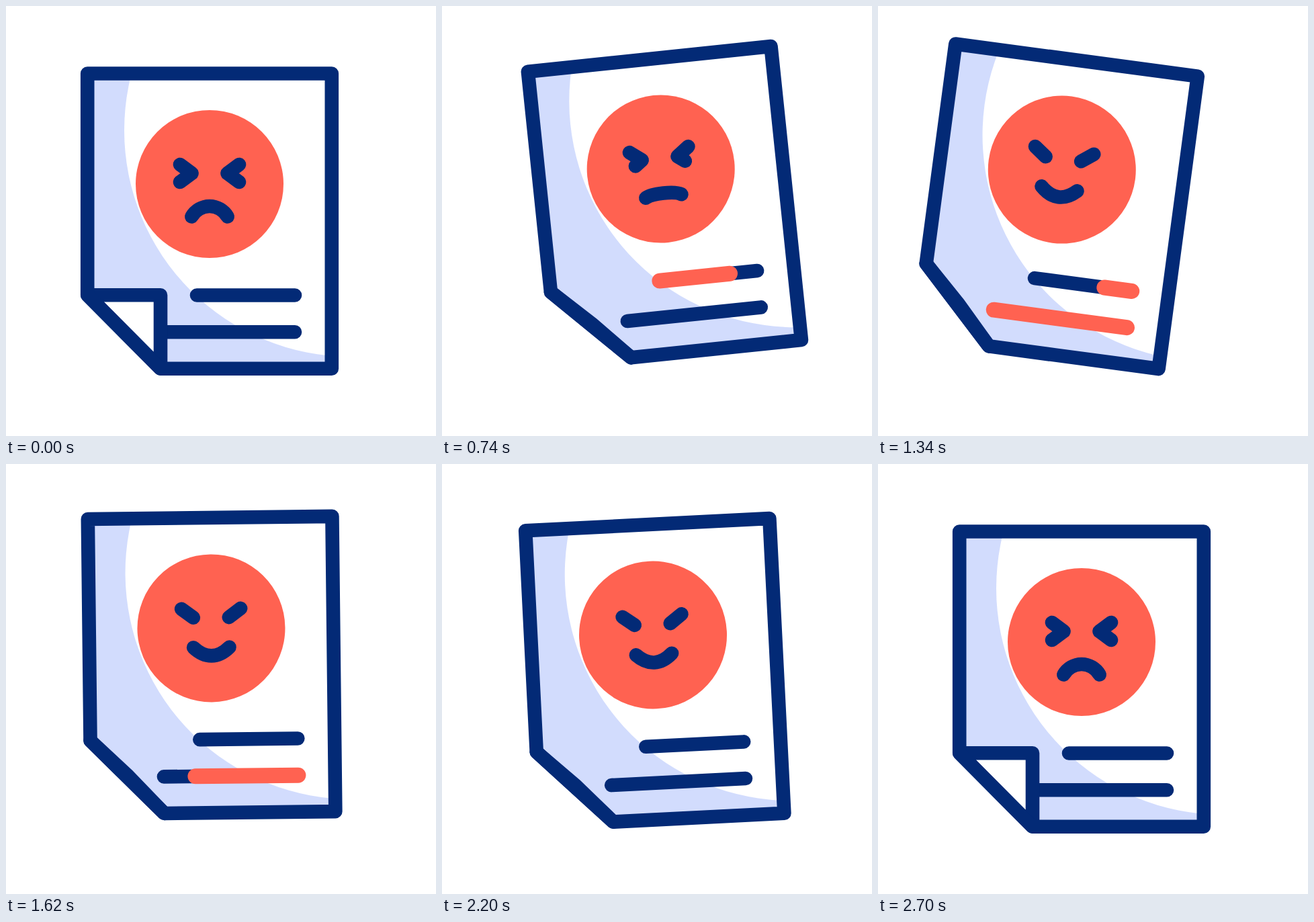
These frames come from a looping animation (640x640 px, 3.02 s). An HTML page:

```html
<!DOCTYPE html>
<html lang="en">
<head>
<meta charset="utf-8">
<title>Angry document</title>
<style>
  html, body { margin: 0; width: 100%; height: 100%; overflow: hidden; background: #fff; }
  svg { display: block; width: 100vw; height: 100vh; }
  .ink, .red { fill: none; stroke: #032a76; stroke-width: 20.6; stroke-linecap: round; stroke-linejoin: round; }
  .red { stroke: #ff6251; stroke-width: 23; }
</style>
</head>
<body>
<svg viewBox="0 0 640 640">
  <defs>
    <clipPath id="sheet"><path d="M121.2 100.5H484.8V539.8H230L121.2 430.3Z"/></clipPath>
  </defs>
  <g id="page">
    <g clip-path="url(#sheet)">
      <path fill="#d2dcfd" d="M121 100H485V540H121Z"/>
      <circle cx="513" cy="185" r="337" fill="#fff"/>
    </g>
    <circle cx="303" cy="265" r="110" fill="#ff6251"/>
    <path class="ink" id="eyes"/>
    <path class="ink" id="mouth"/>
    <path class="ink" d="M284 430.5H430M230 485.2H430"/>
    <path class="red" id="bar1"/>
    <path class="red" id="bar2"/>
    <path class="ink" id="fold" style="fill:#fff"/>
    <path class="ink" d="M121.2 100.5H484.8V539.8H230L121.2 430.3Z"/>
  </g>
</svg>
<script>
const LOOP = 3020;

// [time in ms, value] steps, eased in and out between neighbours
const tracks = {
  tilt: [[200, 0], [718, -6], [1283, 8], [1867, -6], [2517, 0]],
  lift: [[200, 0], [718, -20.5], [1867, -20.5], [2517, 0]],
  flat: [[200, 0], [718, 1], [2183, 1], [2700, 0]],
  evil: [[490, 0], [1080, 1], [2183, 1], [2700, 0]],
  head1: [[350, 0], [950, 1]],
  tail1: [[850, 0], [1606, 1]],
  head2: [[750, 0], [1340, 1]],
  tail2: [[1383, 0], [2139, 1]]
};

const el = id => document.getElementById(id);
const mix = (a, b, k) => a + (b - a) * k;

function at(name, t) {
  const steps = tracks[name];
  if (t <= steps[0][0]) return steps[0][1];
  for (let i = 1; i < steps.length; i++) {
    const [t0, a] = steps[i - 1], [t1, b] = steps[i];
    if (t < t1) {
      const p = (t - t0) / (t1 - t0);
      return mix(a, b, p * p * (3 - 2 * p));
    }
  }
  return steps[steps.length - 1][1];
}

function drawBar(n, x, y, t) {
  const head = at('head' + n, t), tail = at('tail' + n, t);
  const d = head > tail ? `M${mix(x, 430, tail)} ${y}H${mix(x, 430, head)}` : '';
  el('bar' + n).setAttribute('d', d);
}

function draw(t) {
  el('page').setAttribute('transform',
    `translate(0 ${at('lift', t)}) rotate(${at('tilt', t)} 295 45)`);

  const flat = at('flat', t);
  el('fold').setAttribute('d',
    `M121.2 430.3L${mix(230, 177, flat)} ${mix(430.3, 483.5, flat)}L230 539.8Z`);

  const evil = at('evil', t);
  const lid = mix(17.5, 0, evil), lidY = mix(262, 249, evil);
  el('eyes').setAttribute('d',
    `M259 236L276.5 249L${276.5 - lid} ${lidY}M347 236L329.5 249L${329.5 + lid} ${lidY}`);

  const end = mix(313.5, 293.5, evil), bend = mix(304, 299, evil), mid = mix(298, 306, evil);
  el('mouth').setAttribute('d',
    `M276.3 ${end}C282 ${bend} 292 ${mid} 303 ${mid}S324 ${bend} 329.7 ${end}`);

  drawBar(1, 284, 430.5, t);
  drawBar(2, 230, 485.2, t);
}

const start = performance.now();
function tick() {
  draw((performance.now() - start) % LOOP);
  requestAnimationFrame(tick);
}
tick();
</script>
</body>
</html>
```
